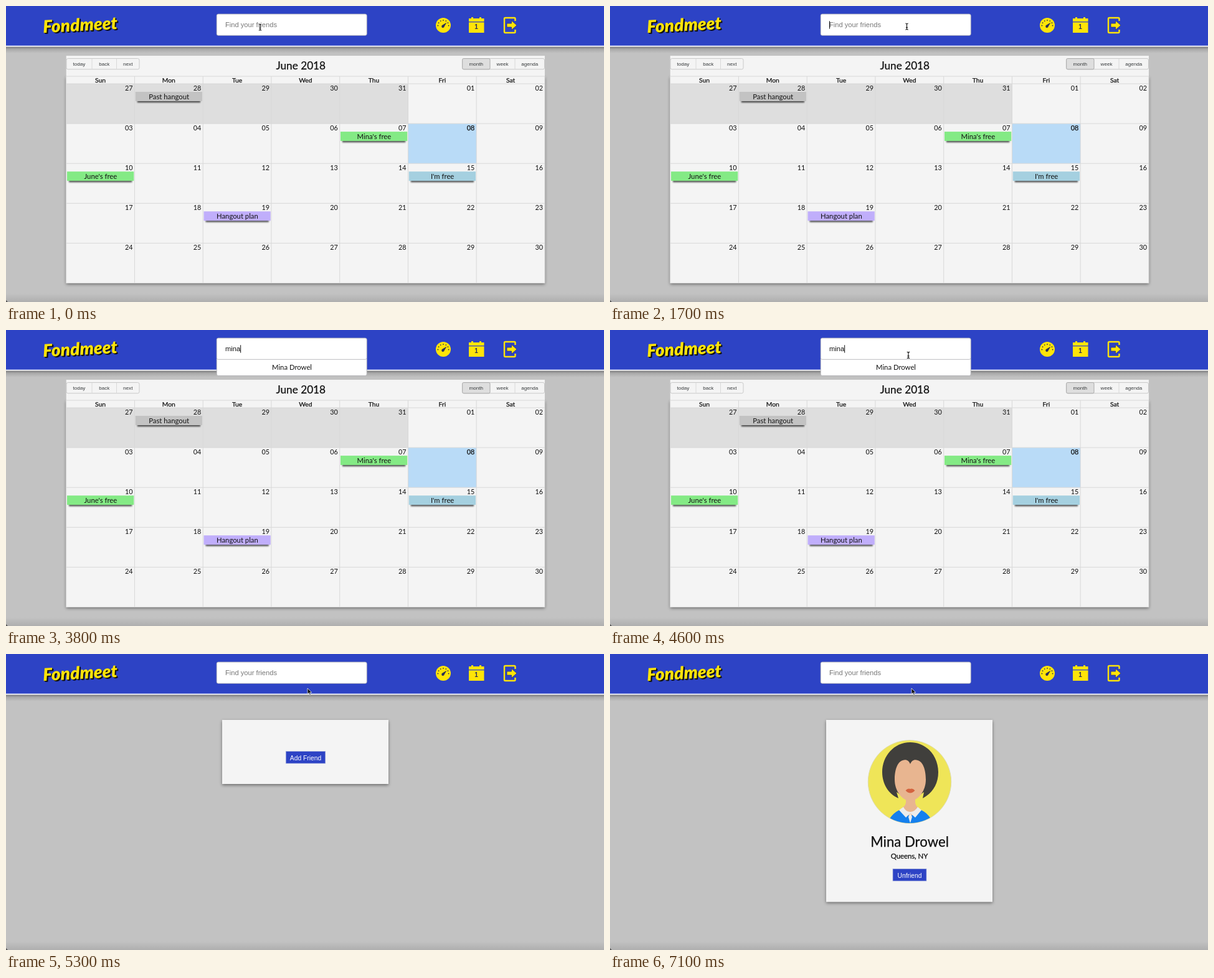
These frames come from a looping animation (960x476 px, 7200 ms). An HTML page:

```html
<!DOCTYPE html>
<html lang="en">
<head>
<meta charset="utf-8">
<title>Find a friend</title>
<style>
html, body { margin: 0; width: 100%; height: 100%; overflow: hidden; background: #c2c2c2; }
svg { display: block; width: 100%; height: 100%; }
text { font-family: Lato, sans-serif; font-size: 11.3px; fill: #111; }
.mid { text-anchor: middle; }
.end { text-anchor: end; }
.medium { stroke: #111; stroke-width: .25px; }
.ui { font-family: "Liberation Sans", Arial, sans-serif; }
.btn { font-size: 8.1px; fill: #373a3c; }
.day { font-size: 10.8px; }
.logo { font-size: 28px; font-weight: 900; font-style: italic; }
</style>
</head>
<body>
<svg viewBox="0 0 960 476">
  <defs>
    <filter id="drop" x="-10%" y="-10%" width="120%" height="130%">
      <feDropShadow dx="0" dy="2" stdDeviation="2.6" flood-opacity=".45"/>
    </filter>
    <filter id="soft" x="-10%" y="-60%" width="120%" height="220%">
      <feGaussianBlur stdDeviation="1.2"/>
    </filter>
    <linearGradient id="under" x2="0" y2="1">
      <stop stop-color="#000" stop-opacity=".42"/>
      <stop offset=".4" stop-color="#000" stop-opacity=".13"/>
      <stop offset="1" stop-color="#000" stop-opacity="0"/>
    </linearGradient>
    <linearGradient id="foot" x2="0" y2="1">
      <stop stop-color="#000" stop-opacity="0"/>
      <stop offset="1" stop-color="#000" stop-opacity=".1"/>
    </linearGradient>
    <clipPath id="round"><circle cx="481" cy="205.5" r="66.5"/></clipPath>
  </defs>

  <rect width="960" height="476" fill="#c2c2c2"/>
  <rect y="462" width="960" height="14" fill="url(#foot)"/>
  <path d="M0 473L3 476H0Z" fill="#555"/>

  <g id="calendar"></g>

  <g id="profile">
    <rect id="card" x="347" y="106" width="267" height="103" fill="#f4f4f4" filter="url(#drop)"/>
    <g id="person">
      <circle cx="481" cy="205.5" r="66.7" fill="#efe558" stroke="#dedca8" stroke-width="1"/>
      <g clip-path="url(#round)">
        <path fill="#403f3c" d="M482 142C508 142 527 164 527 190C527 210 517 224 502 232L504 222L494 229H470L460 222L463 232C447 225 437 209 437 190C437 164 456 142 482 142Z"/>
        <path fill="#1580ee" d="M447 268Q456 252 471 249H493Q508 252 517 268V275H447Z"/>
        <path fill="#e8b590" d="M475 230H490V239Q491 245 496 248L482 262L468 248Q474 245 475 239Z"/>
        <path fill="#ececec" d="M471 246L464 251L475 263L482 256L490 263L500 251L494 246Q490 253 482 254Q474 253 471 246ZM482 256L479 262L482 272L485 262Z"/>
        <path fill="#e8b590" d="M457 202C457 185 462 173 470 171C476 169 480 172 482 177C484 172 488 169 494 171C502 173 507 185 507 202C507 220 495 236 482 236C469 236 457 220 457 202Z"/>
        <path fill="#d4633f" d="M474.5 219.5Q478 215.5 482 217Q486 215.5 489.500 219.500Q486 223.500 482 223.500Q478 223.500 474.500 219.500Z"/>
      </g>
      <text id="fullName" class="mid medium" x="481" y="309.500" style="font-size:22.200px"></text>
      <text class="mid medium" x="480.500" y="328.500">Queens, NY</text>
    </g>
    <g id="action">
      <rect id="actionBox" y="-10" height="19.500" fill="#2d43c5" stroke="#a9b2dc" stroke-width=".7"/>
      <text id="actionText" class="mid ui" x="481" y="4" style="font-size:10.300px;fill:#fff"></text>
    </g>
  </g>

  <rect y="65" width="960" height="11" fill="url(#under)"/>
  <rect width="960" height="64" fill="#2d43c5"/>
  <rect y="63.700" width="960" height="1.900" fill="#f4f5fb"/>

  <g id="logo" transform="rotate(-3 120 30)"></g>

  <g fill="#ffe408">
    <circle cx="702" cy="31" r="12"/>
    <g id="gauge" fill="#2b2f55"></g>
    <path d="M743 20H747V18H750V20H760V18H763V20H767.500V25H743ZM743 26.300H767.500V43H743Z"/>
    <text class="mid ui" x="755" y="36.500" style="font-size:10px;font-weight:700;fill:#2b2f55">1</text>
    <path d="M817.500 24V20.500Q817.500 19 816 19H801.500Q800 19 800 20.500V41.500Q800 43 801.500 43H816Q817.500 43 817.500 41.500V38" fill="none" stroke="#ffe408" stroke-width="2.400"/>
    <path d="M804 28H811.500V23.500L820 31L811.500 38.500V34H804Z" stroke="#26307a" stroke-width=".8"/>
  </g>

  <g id="menu"></g>
  <rect x="338.200" y="13" width="241" height="34.300" rx="2.500" fill="#fff" stroke="#b4b4b8" stroke-width=".9"/>
  <text id="query" class="ui" x="352" y="34.300" style="font-size:11.150px"></text>
  <rect id="caret" y="24.200" width="1" height="12.500" fill="#111"/>

  <g id="beam" fill="none">
    <path id="beamHalo" d="M-2.200 -5Q0 -5 0 -3.500Q0 -5 2.200 -5M0 -3.500V3.500M-2.200 5Q0 5 0 3.500Q0 5 2.200 5M-1.500 1.500H1.500" stroke="#fff" stroke-width="2.200"/>
    <path d="M-2.200 -5Q0 -5 0 -3.500Q0 -5 2.200 -5M0 -3.500V3.500M-2.200 5Q0 5 0 3.500Q0 5 2.200 5M-1.500 1.500H1.500" stroke="#111" stroke-width="1.100"/>
  </g>
  <path id="hand" d="M-1.800 -5Q-.7 -6 0 -4.800V-1.500Q1 -2.200 1.500 -1.200Q2.600 -1.700 3 -.6Q4.200 -.8 4.200 .5V2.500Q3.800 4 3 5.500H-1.500Q-3 3 -4.200 .8Q-3.500 -.3 -2 1Z" fill="#fff" stroke="#111" stroke-width=".9" stroke-linejoin="round"/>
  <path id="arrow" d="M484 55V64.500L486.200 62.500L487.700 66L489.300 65.300L487.800 62H490.800Z" fill="#111" stroke="#fff" stroke-width=".7"/>
</svg>
<script>
const LOOP = 7200, STEP = 100;
const BRAND = "Fondmeet";
const FRIEND = "Mina Drowel";
const PEOPLE = ["Jem Halstor", FRIEND, "Jordan Minsel"];
const KEYS = [[2200, "m"], [2700, "mi"], [3000, "min"], [3400, "mina"]];
const FOCUS = 1300, SHOW = 4400, OPEN = 5300, LOADED = 5400;

const $ = id => document.getElementById(id);
const show = (id, on) => $(id).setAttribute("display", on ? "inline" : "none");
const move = (id, x, y) => $(id).setAttribute("transform", `translate(${x} ${y})`);
const rect = (x, y, w, h, more) => `<rect x="${x}" y="${y}" width="${w}" height="${h}" ${more}/>`;
const label = (x, y, cls, s) => `<text x="${x}" y="${y}" class="${cls}">${s}</text>`;
const line = (x1, y1, x2, y2) => `<path d="M${x1} ${y1}L${x2} ${y2}" stroke="#d8d8d8"/>`;

const LEFT = 96.7, TOP = 125, COL = 109.75, ROW = 64.1, WIDE = COL * 7, BOTTOM = TOP + ROW * 5;
const colX = c => LEFT + c * COL;
const rowY = r => TOP + r * ROW;

function buttons(names, edges, active) {
  const x0 = edges[0], x1 = edges[edges.length - 1];
  let s = rect(x0, 84.5, x1 - x0, 17.3, 'rx="2.5" fill="#f4f4f4" stroke="#c9c9c9"');
  names.forEach((name, i) => {
    const x = edges[i], w = edges[i + 1] - x;
    if (name === active) s += rect(x, 84.5, w, 17.3, 'rx="2" fill="#dedede" stroke="#a9a9a9"');
    else if (i && names[i - 1] !== active) s += line(x, 85, x, 101.5);
    s += label(x + w / 2, 96, "ui btn mid", name);
  });
  return s;
}

function chip(c, r, color, name) {
  const x = colX(c) + 1.3, y = rowY(r) + 13;
  return rect(x + 3, y + 6, COL - 8.5, 11.3, 'fill="#000" opacity=".65" filter="url(#soft)"') +
    rect(x, y, COL - 2.5, 15, `fill="${color}"`) +
    label(x + COL / 2 - 1, y + 11.6, "mid", name);
}

function buildCalendar() {
  let s = rect(LEFT, 113, WIDE, BOTTOM - 113, 'fill="#f4f4f4" filter="url(#drop)"') +
    rect(LEFT, 80, WIDE, 34, 'fill="#f4f4f4"') +
    buttons(["today", "back", "next"], [97, 138, 177.5, 214]) +
    buttons(["month", "week", "agenda"], [732.7, 777, 817, 864.5], "month") +
    `<text class="mid medium" x="473.3" y="102.3" style="font-size:17.2px">June 2018</text>`;
  s += rect(LEFT, TOP, COL * 5, ROW, 'fill="#dedede"') +
    rect(colX(5), rowY(1), COL, ROW, 'fill="#b9dbf7"') + line(LEFT, 113, LEFT + WIDE, 113);
  for (let r = 0; r <= 5; r++) s += line(LEFT, rowY(r), LEFT + WIDE, rowY(r));
  for (let c = 0; c <= 7; c++) s += line(colX(c), 113, colX(c), BOTTOM);
  ["Sun", "Mon", "Tue", "Wed", "Thu", "Fri", "Sat"].forEach((d, c) => {
    s += `<text class="mid medium" x="${colX(c) + COL / 2}" y="122.7" style="font-size:10.3px">${d}</text>`;
  });
  for (let i = 0; i < 35; i++) {
    const r = Math.floor(i / 7), c = i % 7;
    const n = i < 5 ? 27 + i : i - 4;
    s += label(colX(c + 1) - 3, rowY(r) + 10.8, i === 12 ? "day end medium" : "day end", String(n).padStart(2, "0"));
  }
  s += chip(1, 0, "#c3c3c3", "Past hangout") + chip(4, 1, "#84ea85", "Mina's free") +
    chip(0, 2, "#84ea85", "June's free") + chip(5, 2, "#a5d0e0", "I'm free") +
    chip(2, 3, "#c0aefb", "Hangout plan");
  $("calendar").innerHTML = s;
}

function buildHeader() {
  $("logo").innerHTML = [["#111", 2], ["#111", 1], ["#ffe408", 0]].map(([color, d]) =>
    `<text class="logo mid" x="${119 + d}" y="${40 + d}" style="fill:${color}">${BRAND}</text>`).join("");
  let s = "";
  for (let i = 0; i < 7; i++) {
    const a = Math.PI * (1 + i / 6);
    s += `<circle cx="${702 + 8.6 * Math.cos(a)}" cy="${31.5 + 8.6 * Math.sin(a)}" r=".9"/>`;
  }
  $("gauge").innerHTML = s + '<path d="M707.5 26.5L703.8 32.8A2.3 2.300 0 1 1 700.800 30.500Z"/>';
}

function drawMenu(query, hover) {
  const found = query ? PEOPLE.filter(p => p.toLowerCase().includes(query)) : [];
  let s = "";
  if (found.length) {
    const h = found.length * 26;
    s = rect(338.2, 44, 241, h + 3.4, `rx="2.5" fill="${hover ? "#dadada" : "#fff"}" stroke="#b4b4b8" stroke-width=".9"`);
    found.forEach((p, i) => { s += label(459, 64.2 + i * 26, "mid", p); });
  }
  $("menu").innerHTML = s;
}

const ease = (t, a, b) => {
  const k = Math.min(1, Math.max(0, (t - a) / (b - a)));
  return k * k * (3 - 2 * k);
};

function drawPointer(t) {
  const across = ease(t, 100, 1200), down = ease(t, SHOW, 5000);
  const x = 408 + 68.5 * across + 9.5 * down;
  const y = 34 - across + 28.5 * down;
  const over = y > 47.5;
  const seen = t < KEYS[0][0] || t >= SHOW;
  move("beam", x, y);
  move("hand", x, y);
  show("beam", seen && !over);
  show("hand", over && t < OPEN);
  show("arrow", t >= OPEN);
  return over;
}

function drawSearch(t, over) {
  const key = t < OPEN && KEYS.filter(k => t >= k[0]).pop();
  const query = key ? key[1] : "";
  const field = $("query");
  field.textContent = query || "Find your friends";
  field.style.fill = query ? "#111" : "#777";
  const since = t - (key ? key[0] : FOCUS);
  show("caret", t >= FOCUS && t < OPEN && since % 1000 < 500);
  $("caret").setAttribute("x", 352 + (query ? field.getComputedTextLength() : 0));
  drawMenu(query, over);
}

function drawProfile(t) {
  const full = t >= LOADED, w = full ? 54 : 63.5;
  show("calendar", t < OPEN);
  show("profile", t >= OPEN);
  show("person", full);
  $("card").setAttribute("height", full ? 292.5 : 103);
  $("actionText").textContent = full ? "Unfriend" : "Add Friend";
  $("actionBox").setAttribute("x", 481 - w / 2);
  $("actionBox").setAttribute("width", w);
  move("action", 0, full ? 355.5 : 166.5);
}

function draw(now) {
  const t = Math.floor(now % LOOP / STEP) * STEP;
  drawSearch(t, drawPointer(t));
  drawProfile(t);
  requestAnimationFrame(draw);
}

buildCalendar();
buildHeader();
$("fullName").textContent = FRIEND;
draw(0);
</script>
</body>
</html>
```
